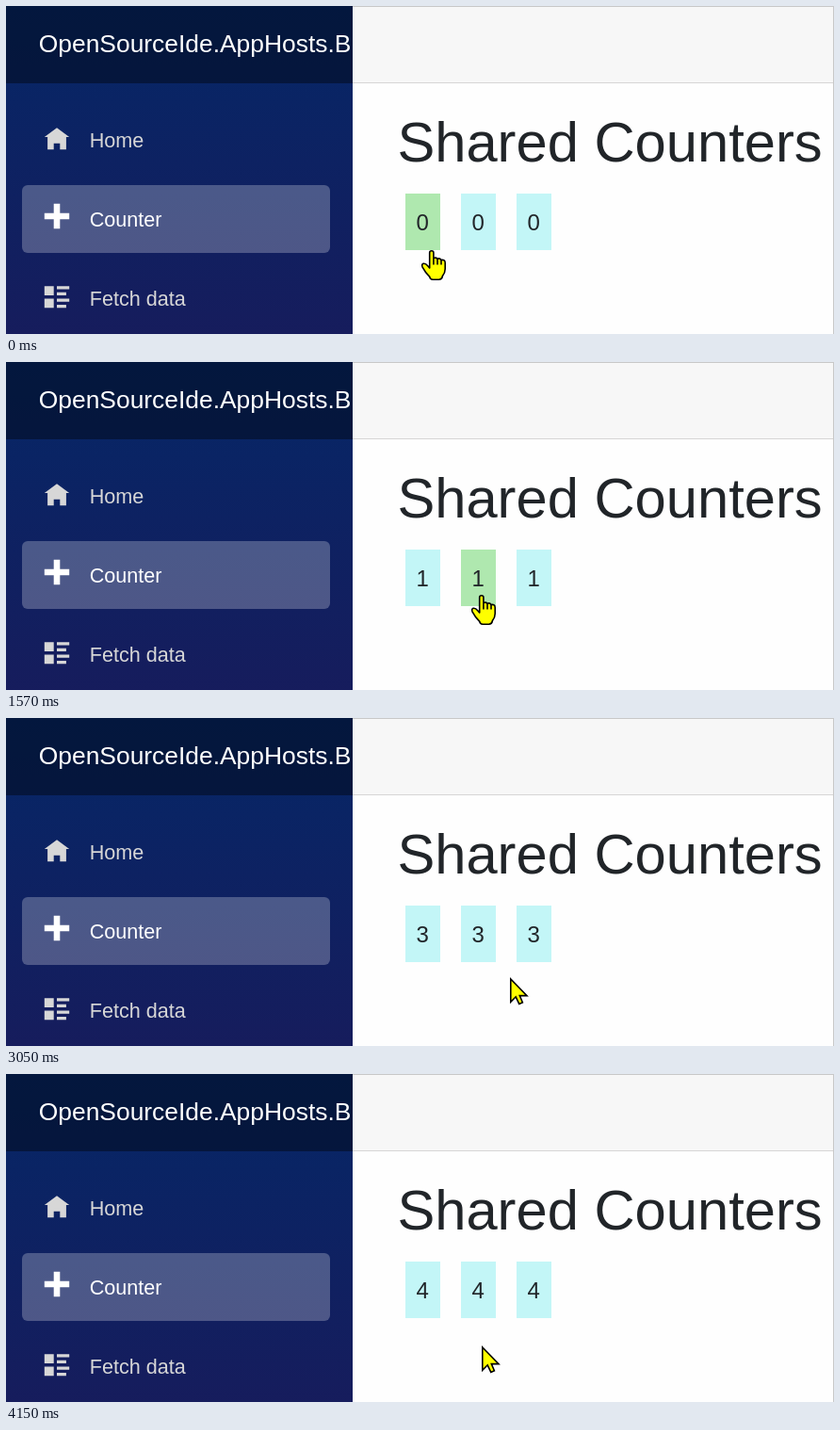
An HTML page with a canvas that plays this animation: 879x348 px, repeating every 4.61 s.

```html
<!DOCTYPE html>
<html lang="en">
<head>
<meta charset="utf-8">
<title>Shared Counters</title>
<style>
  html, body { margin: 0; width: 100%; height: 100%; overflow: hidden; background: #fefefe; }
  canvas { display: block; width: 879px; height: 348px; }
</style>
</head>
<body>
<canvas id="stage" width="879" height="348"></canvas>
<script>
const W = 879, H = 348, SIDE = 368, LOOP = 4610, TICK = 70;
const FONT = '"Liberation Sans", Arial, sans-serif';
const ctx = document.getElementById('stage').getContext('2d');

const CELL = { x: 424, y: 199, w: 37, h: 60, pitch: 59, count: 3 };
const CLICKS = [880, 1840, 2850, 3860];

const ICONS = {
  home: new Path2D('M4 0l-4 3h1v4h2v-2h2v2h2v-4.03l1 .03-4-3z'),
  plus: new Path2D('M3 0v3h-3v2h3v3h2v-3h3v-2h-3v-3h-2z'),
  list: new Path2D('M0 0v3h3v-3zM4 0v1h4v-1zM4 2v1h3v-1zM0 4v3h3v-3zM4 4v1h4v-1zM4 6v1h3v-1z')
};
const ARROW = new Path2D('M.8 1V25.2L6.2 19.8L9.8 27.4L13.4 25.8L10.3 18.6H18Z');
const HAND = new Path2D('M-1.3 19V2.8Q-1.3 .8 .8 .8Q2.9 .8 2.9 2.8V8.6Q5.4 7.4 7 9.3' +
  'Q9.6 8.2 11 10.5Q15.2 9.8 15.2 13.5V20Q15.2 24 12.4 27.5Q11.8 31.2 8.5 31.2H2' +
  'Q-.8 31.2 -1.2 28.4Q-6 23.5 -9 17.8Q-10 15 -8 14.3Q-5.6 13.8 -3 17Z');
const KNUCKLES = new Path2D('M2.9 8.6V15.5M7 9.3V15.5M11 10.5V15.5');

// Each move is a few [time, x, y] points; the pointer rests between moves
const MOVES = [
  [[0, 451, 259]],
  [[290, 447, 247], [500, 442, 223], [750, 450, 250]],
  [[880, 450, 250], [1090, 489, 293], [1230, 515, 300]],
  [[1370, 514, 296], [1570, 504, 247], [1700, 491, 238]],
  [[1840, 491, 238], [2030, 508, 274], [2240, 560, 321], [2310, 570, 318]],
  [[2380, 572, 306], [2640, 565, 247], [2710, 560, 242]],
  [[2850, 560, 241], [3170, 518, 299], [3340, 482, 286]],
  [[3400, 483, 271], [3460, 488, 257], [3730, 497, 241]],
  [[3940, 499, 254], [4150, 505, 289]]
];

const mix = (a, b, u) => a + (b - a) * u;

// Straight runs between points, sampled in even steps of about one tick
function pointerAt(t) {
  const move = MOVES.findLast(m => t >= m[0][0]);
  const k = move.findLastIndex(p => t >= p[0]);
  const [t0, x0, y0] = move[k];
  if (k === move.length - 1) return [x0, y0];
  const [t1, x1, y1] = move[k + 1];
  const steps = Math.max(1, Math.round((t1 - t0) / TICK));
  const u = Math.floor((t - t0) / (t1 - t0) * steps) / steps;
  return [mix(x0, x1, u), mix(y0, y1, u)];
}

function cellUnder([x, y]) {
  const i = Math.floor((x - CELL.x) / CELL.pitch);
  const inside = x - CELL.x - i * CELL.pitch < CELL.w && y < 264;
  return inside && i >= 0 && i < CELL.count ? i : -1;
}

function box(color, x, y, w, h) {
  ctx.fillStyle = color;
  ctx.fillRect(x, y, w, h);
}

function text(str, x, y, size, color) {
  ctx.font = `${size}px ${FONT}`;
  ctx.fillStyle = color;
  ctx.fillText(str, x, y);
}

function navItem(icon, label, iconY, baseline, color) {
  ctx.save();
  ctx.translate(40.8, iconY);
  ctx.scale(3.3, 3.3);
  ctx.fillStyle = color;
  ctx.fill(ICONS[icon]);
  ctx.restore();
  text(label, 88.7, baseline, 21.6, color);
}

function drawSidebar() {
  ctx.save();
  ctx.beginPath();
  ctx.rect(0, 0, SIDE, H);
  ctx.clip();
  const shade = ctx.createLinearGradient(0, 0, 0, 1080);
  shade.addColorStop(0, 'rgb(5,39,103)');
  shade.addColorStop(1, '#3a0647');
  box(shade, 0, 0, SIDE, H);
  box('rgba(0,0,0,.4)', 0, 0, SIDE, 82);
  text('OpenSourceIde.AppHosts.B', 34.8, 49, 26.4, '#fff');

  ctx.fillStyle = 'rgba(255,255,255,.25)';
  ctx.beginPath();
  ctx.roundRect(17, 190, 327, 72, 6);
  ctx.fill();
  navItem('home', 'Home', 129.2, 150, '#d7d7d7');
  navItem('plus', 'Counter', 209.8, 234, '#fff');
  navItem('list', 'Fetch data', 297.2, 318, '#d7d7d7');
  ctx.restore();
}

function drawPage() {
  box('#fefefe', SIDE, 0, W - SIDE, H);
  box('#f7f7f7', SIDE, 0, W - SIDE, 81);
  box('#d6d5d5', SIDE, 81, W - SIDE, 1);
  box('#c8c8c8', SIDE, 0, W - SIDE, 1);
  box('#c8c8c8', W - 1, 0, 1, H);
  text('Shared Counters', 415.4, 165, 59.7, '#212529');
}

function drawCells(count, lit) {
  for (let i = 0; i < CELL.count; i++) {
    const x = CELL.x + i * CELL.pitch;
    box(i === lit ? '#afe8af' : '#c3f6f7', x, CELL.y, CELL.w, CELL.h);
    text(count, x + 11.5, 238, 24, '#212529');
  }
}

function drawPointer([x, y], hand) {
  ctx.save();
  ctx.translate(Math.round(x), Math.round(y));
  ctx.lineWidth = 1.6;
  ctx.lineJoin = hand ? 'round' : 'miter';
  ctx.strokeStyle = '#000';
  ctx.fillStyle = '#ff0';
  const shape = hand ? HAND : ARROW;
  ctx.fill(shape);
  ctx.stroke(shape);
  if (hand) ctx.stroke(KNUCKLES);
  ctx.restore();
}

function frame() {
  const t = performance.now() % LOOP;
  const tip = pointerAt(t);
  const over = cellUnder(tip);
  // A cell keeps its highlight for one tick after the pointer leaves
  const lit = over >= 0 ? over : cellUnder(pointerAt(Math.max(0, t - TICK)));
  drawPage();
  drawSidebar();
  drawCells(CLICKS.filter(c => c <= t).length, lit);
  drawPointer(tip, over >= 0);
  requestAnimationFrame(frame);
}
frame();
</script>
</body>
</html>
```
